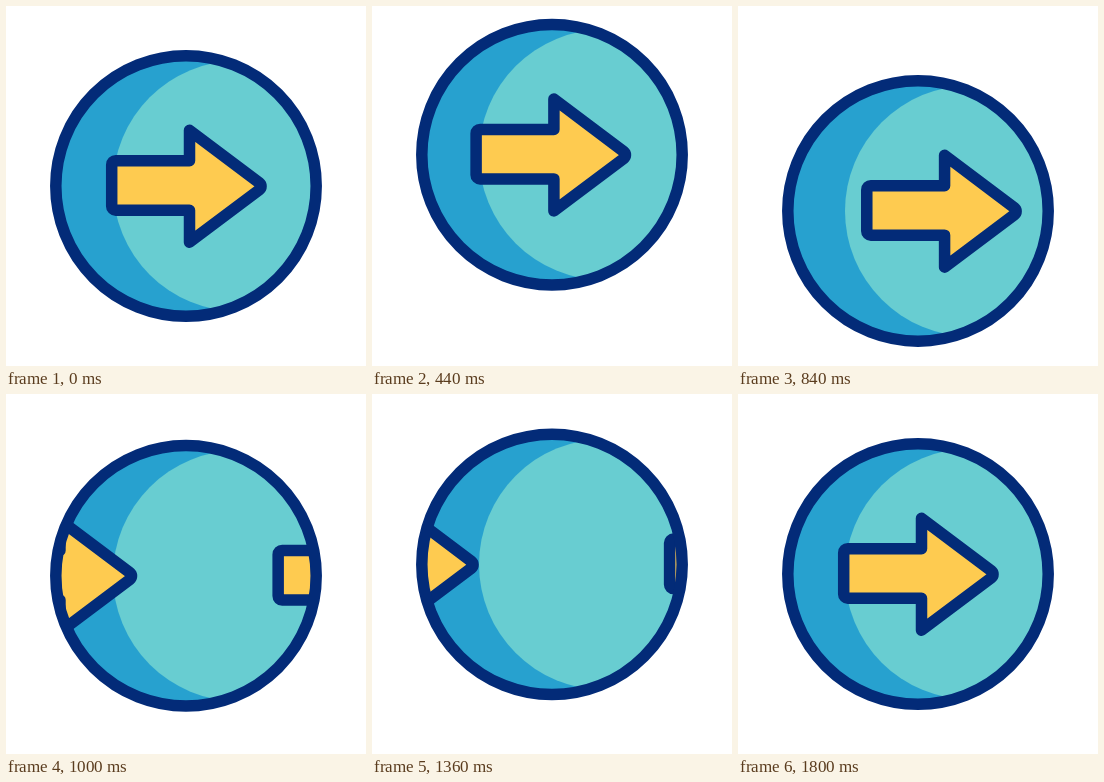
An HTML page for the animation above (2000 ms loop, 360x360 px).

```html
<!DOCTYPE html>
<html>
<head>
<meta charset="utf-8">
<style>
html, body { margin: 0; width: 100%; height: 100%; overflow: hidden; background: #fff; }
svg { display: block; width: 100vw; height: 100vh; }
.ink { stroke: #032b78; stroke-width: 11.5; stroke-linejoin: round; }
</style>
</head>
<body>
<svg viewBox="0 0 360 360">
  <defs>
    <clipPath id="disc"><circle cx="180" cy="180" r="130"/></clipPath>
    <path id="arrow" class="ink" fill="#fecb50"
      d="M109.7 154.7H183.5V124.3L253.4 176.9A4.3 4.3 0 0 1 253.4 183.7L183.5 236.2V204.2H109.7A4 4 0 0 1 105.7 200.2V158.7A4 4 0 0 1 109.7 154.7Z"/>
  </defs>
  <g id="badge">
    <g clip-path="url(#disc)">
      <circle cx="180" cy="180" r="130" fill="#27a1cf"/>
      <circle cx="232.4" cy="180" r="125.4" fill="#68cdd1"/>
      <use id="leaving" href="#arrow"/>
      <use id="entering" href="#arrow"/>
    </g>
    <circle class="ink" cx="180" cy="180" r="130.2" fill="none"/>
  </g>
</svg>
<script>
const LOOP = 2000, STEP = 40;

// Bounce of the badge: [time, vertical offset]
const bounce = [[0, 0], [381, -35], [773, 26], [806, 26], [1181, -20], [1530, 0]];

// Arrow passes: [start, end, distance out, distance in]
const passes = [
  [0, 460, 290, 290],
  [480, 766, 258, 300],
  [766, 1198, 296, 296],
  [1198, 1531, 400, 296]
];

const ease = (t, a, b) => {
  const x = Math.min(1, Math.max(0, (t - a) / (b - a)));
  return x * x * (3 - 2 * x);
};
const move = (id, x, y) =>
  document.getElementById(id).setAttribute('transform', `translate(${x} ${y})`);

function draw(t) {
  let y = 0;
  for (let i = 1; i < bounce.length; i++) {
    const [a, from] = bounce[i - 1], [b, to] = bounce[i];
    y += (to - from) * ease(t, a, b);
  }
  const [start, end, out, back] = passes.filter(p => p[0] <= t).pop();
  const p = ease(t, start, end);
  move('badge', 0, y);
  move('leaving', out * p, 0);
  move('entering', back * (p - 1), 0);
}

const origin = performance.now();
function tick() {
  const t = (performance.now() - origin) % LOOP;
  draw(Math.floor(t / STEP) * STEP);
  requestAnimationFrame(tick);
}
tick();
</script>
</body>
</html>
```
